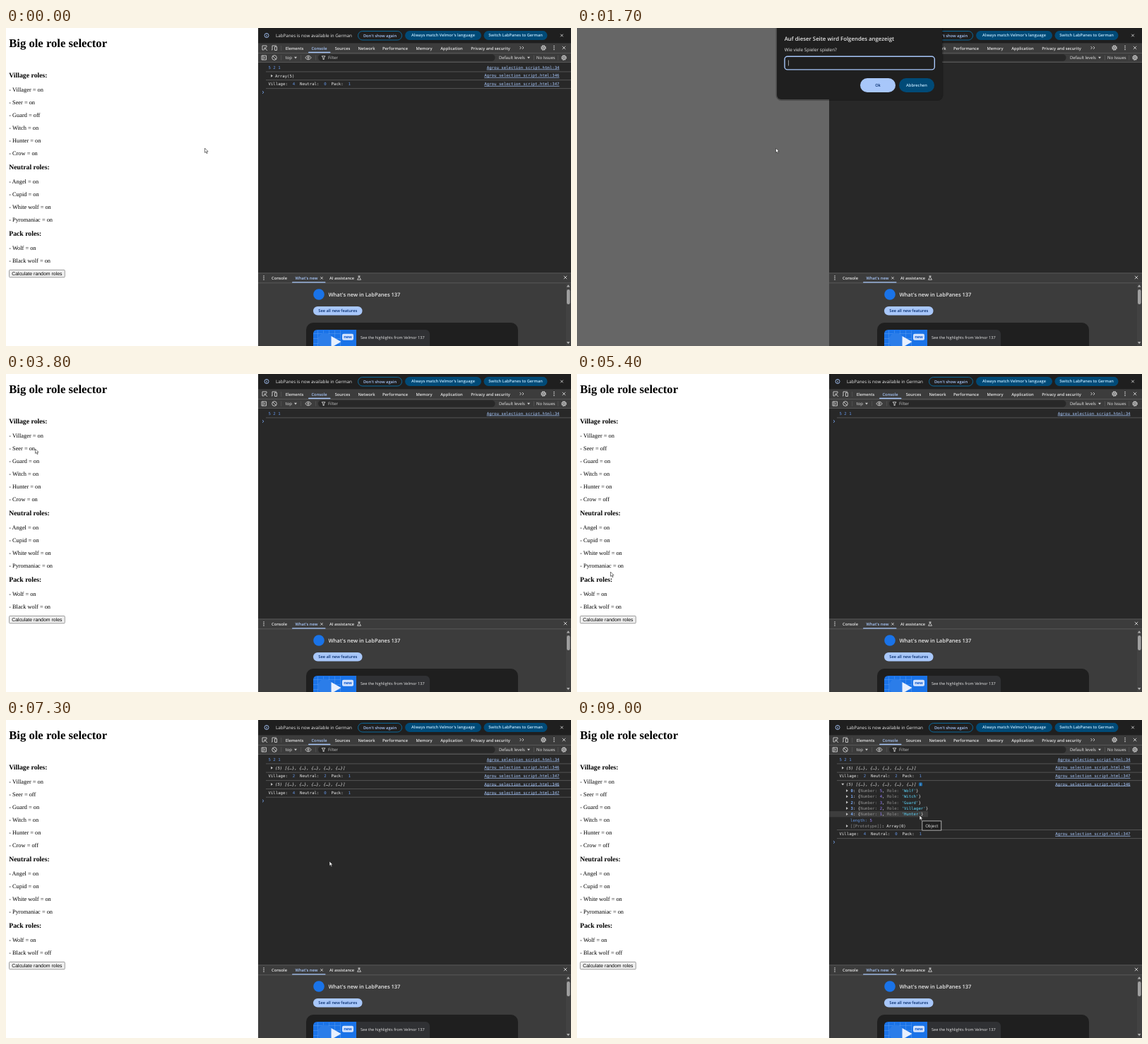
Recreate the animation shown at these times as an HTML page. Size 800 by 450 pixels, loop 9.3 s.

```html
<!DOCTYPE html>
<html lang="en">
<head>
<meta charset="utf-8">
<title>Role selector</title>
<style>
html, body { margin: 0; width: 100%; height: 100%; overflow: hidden; background: #282828; }
svg { display: block; width: 100vw; height: 100vh; }
text { white-space: pre; text-rendering: geometricPrecision; }
.ui { font-family: "Open Sans", "Noto Sans", sans-serif; }
.serif { font-family: "Liberation Serif", "Times New Roman", serif; }
.arial { font-family: "Liberation Sans", Arial, sans-serif; }
.mono { font-family: "DejaVu Sans Mono", monospace; font-size: 5.7px; }
.icon { fill: none; stroke: #d0d0d0; stroke-width: .9; }
</style>
</head>
<body>
<svg id="stage" viewBox="0 0 800 450"></svg>
<script>
const NS = 'http://www.w3.org/2000/svg';
const stage = document.getElementById('stage');
const PALE = '#a8c7fa', TEXT = '#e8e8e8', BLUE = '#6496e8', GREY = '#8f8f8f', CYAN = '#5cd5fb', VIOLET = '#9980ff';
const BAR = '#3c3c3c', DARK = '#1f1f1f', RULE = '#5e5e5e';
const EDGE = 357;

function add(parent, tag, attrs = {}) {
  const node = document.createElementNS(NS, tag);
  for (const key in attrs) node.setAttribute(key, attrs[key]);
  parent.append(node);
  return node;
}
const group = (parent = stage) => add(parent, 'g');
const rect = (g, x, y, width, height, fill, rx = 0, more = {}) =>
  add(g, 'rect', { x, y, width, height, fill, rx, ...more });
const path = (g, d, more = {}) => add(g, 'path', { d, class: 'icon', ...more });
const ring = (g, cx, cy, r, more = {}) => add(g, 'circle', { cx, cy, r, class: 'icon', ...more });

// y is the vertical middle of the line
function label(g, x, y, string, size = 6, more = {}) {
  const node = add(g, 'text', { x, y: y + size * .35, 'font-size': size, fill: TEXT, class: 'ui', ...more });
  node.textContent = string;
  return node;
}
const middle = { 'text-anchor': 'middle' };
const strong = { 'font-weight': 600 };

function code(g, x, y, parts, more = {}) {
  const node = add(g, 'text', { x, y: y + 2, class: 'mono', ...more });
  for (const [string, fill, weight = 400] of parts)
    add(node, 'tspan', { fill, 'font-weight': weight }).textContent = string;
}
const rule = (g, y, x = EDGE, fill = RULE) => rect(g, x, y, 800 - x, .8, fill);
const cross = (g, x, y, r = 2.2) => path(g, `M${x - r} ${y - r}l${2 * r} ${2 * r}m0 ${-2 * r}l${-2 * r} ${2 * r}`);
const triangle = (g, x, y, open) =>
  path(g, open ? `M${x - 2} ${y - 1.2}h4l-2 2.8z` : `M${x - 1.2} ${y - 2}v4l2.8 -2z`, { style: 'fill:#c7c7c7;stroke:none' });
const dots = (g, x, y) => [-2.6, 0, 2.6].forEach(d => add(g, 'circle', { cx: x, cy: y + d, r: .75, fill: TEXT }));
function gear(g, x, y) {
  ring(g, x, y, 3, { style: 'stroke-width:1.5;stroke-dasharray:1.55 .8' });
  ring(g, x, y, 2.3);
  ring(g, x, y, .9);
}

// Web page
const page = group();
rect(page, 0, 0, EDGE, 450, '#fff');
const ink = { class: 'serif', fill: '#000' }, bold = { ...ink, 'font-weight': 700 };
const MARGIN = 4.2;
label(page, MARGIN, 20.7, 'Big ole role selector', 16.67, bold);
const roles = {};
function section(y, title, names) {
  label(page, MARGIN, y, title, 9.75, bold);
  names.forEach((name, i) => roles[name] = label(page, MARGIN, y + 20 + i * 18, '', 8.33, ink));
}
section(67, 'Village roles:', ['Villager', 'Seer', 'Guard', 'Witch', 'Hunter', 'Crow']);
section(197, 'Neutral roles:', ['Angel', 'Cupid', 'White wolf', 'Pyromaniac']);
section(291, 'Pack roles:', ['Wolf', 'Black wolf']);
rect(page, 4.5, 342.4, 78.8, 10.4, '#efefef', 1.2, { stroke: '#767676', 'stroke-width': .7 });
label(page, 43.9, 347.4, 'Calculate random roles', 6.94, { ...middle, class: 'arial', fill: '#000' });
const dim = rect(stage, 0, 0, EDGE, 450, '#666');

// Developer panel
const panel = group();
rect(panel, EDGE, 0, 443, 450, '#282828');
rect(panel, EDGE, 0, 443, 21.5, DARK);
ring(panel, 369, 10.5, 3, { style: 'stroke:#a8c7fa' });
path(panel, 'M369 10v2.2M369 8.5v.8', { style: 'stroke:#a8c7fa' });
label(panel, 382, 11, 'LabPanes is now available in German', 6.25);
function pill(g, x, y, w, h, string, fill, color, more = {}) {
  rect(g, x, y, w, h, fill, h / 2, more);
  label(g, x + w / 2, y + h / 2, string, 5.7, { ...middle, ...strong, fill: color });
}
pill(panel, 498.5, 4.5, 62, 12.5, "Don't show again", 'none', PALE, { stroke: '#0b71a8', 'stroke-width': .9 });
pill(panel, 565, 4, 108, 13, "Always match Velmor's language", '#004a77', '#c2e7ff');
pill(panel, 676.5, 4, 90, 13, 'Switch LabPanes to German', '#004a77', '#c2e7ff');
cross(panel, 787, 10.5, 1.8);

rect(panel, EDGE, 21.5, 443, 27, BAR);
rule(panel, 35);
rule(panel, 48.2);
path(panel, 'M369 27v-2h-6v6h2M366 28l4 4M366 31v-3h3');
path(panel, 'M377 31h-1M377 31v-6h6M380.5 26.5h3v5h-3z');
rect(panel, 389.5, 25, .6, 7, RULE);
const tabs = [[408.5, 'Elements'], [443.5, 'Console'], [476.5, 'Sources'], [510.5, 'Network'], [551, 'Performance'],
  [592, 'Memory'], [631, 'Application'], [686, 'Privacy and security']];
for (const [x, name] of tabs)
  label(panel, x, 28.7, name, 5.75, { ...middle, ...strong, fill: name === 'Console' ? PALE : TEXT });
rect(panel, 428, 33.8, 31.5, 1.4, PALE, .7);
path(panel, 'M727.5 26l2 2 -2 2M731 26l2 2 -2 2');
gear(panel, 761, 28);
dots(panel, 776, 28);
cross(panel, 790, 28);

path(panel, 'M362 39h6.5v6h-6.5zM364 39v6M367 40.7l-1.6 1.3 1.6 1.3');
ring(panel, 380, 42, 3.3);
path(panel, 'M377.7 39.7l4.6 4.6');
for (const x of [389.5, 417.5, 438.5, 747, 781.5]) rect(panel, x, 38.5, .6, 7, RULE);
label(panel, 395.5, 42, 'top', 6);
triangle(panel, 410, 42, true);
path(panel, 'M423.7 42q4.3 -5.6 8.6 0q-4.3 5.6 -8.6 0z');
ring(panel, 428, 42, 1.2);
rect(panel, 442, 37.2, 250.5, 9.6, '#282828', 4.8);
path(panel, 'M447.2 39.8h4.8l-1.8 2.4v2.3h-1.2v-2.3z');
label(panel, 456, 42, 'Filter', 6, { fill: '#c7c7c7' });
label(panel, 698, 42, 'Default levels', 5.9);
triangle(panel, 740, 42, true);
label(panel, 751, 42, 'No Issues', 5.9);
gear(panel, 790, 42);

// Drawer
rect(panel, EDGE, 346.5, 443, 104, BAR);
rule(panel, 346.5);
rule(panel, 360.4);
dots(panel, 365, 353.5);
label(panel, 376, 354, 'Console', 5.75, strong);
label(panel, 409.5, 354, "What's new", 5.75, { ...strong, fill: PALE });
cross(panel, 447, 353.8, 1.7);
rect(panel, 405, 359.2, 47.5, 1.4, PALE, .7);
label(panel, 458, 354, 'AI assistance', 5.65, strong);
path(panel, 'M498.5 351h3M499.3 351v2.2l-1.8 3h5l-1.8 -3v-2.2');
cross(panel, 792, 353);
add(panel, 'circle', { cx: 443, cy: 377, r: 7.8, fill: '#1a73e8' });
label(panel, 456.5, 377.3, "What's new in LabPanes 137", 7.5, strong);
pill(panel, 435, 394, 69.5, 12.5, 'See all new features', PALE, '#062e6f');
rect(panel, 425, 417, 300, 50, DARK, 10);
rect(panel, 435, 427, 165, 40, '#303134', 6);
path(panel, 'M435 450v-17q0 -6 6 -6h55v23z', { style: 'fill:#1a73e8;stroke:none' });
for (let x = 441; x < 476; x += 8) rect(panel, x, 428, .5, 22, '#5b9cf0');
for (let y = 432; y < 450; y += 7) rect(panel, 435, y, 39, .5, '#5b9cf0');
add(panel, 'circle', { cx: 452, cy: 442, r: 10.5, fill: '#2b7de9' });
path(panel, 'M460.5 436v14h3.5l10.5 -6z', { style: 'fill:#e8f0fe;stroke:none' });
rect(panel, 476, 432.8, 16, 9, '#d3e3fd', 2);
label(panel, 484, 437.2, 'new', 5.6, { ...middle, fill: '#0b57d0', 'font-weight': 700 });
label(panel, 502, 438, 'See the highlights from Velmor 137', 5.55);
rect(panel, 793, 361, 7, 89, '#424242');
rect(panel, 794, 370, 4.6, 21, '#9f9f9f', 2.3);
path(panel, 'M793.8 366.5h4.6l-2.3 -3.2zM793.8 444h4.6l-2.3 3.2z', { style: 'fill:#b0b0b0;stroke:none' });

// Console logs
const CHAR = 3.43;
function link(g, y, line) {
  const name = `Agrou selection script.html:${line}`, end = 783.5, width = name.length * CHAR;
  code(g, end, y, [[name, PALE]], { 'text-anchor': 'end' });
  rect(g, end - width, y + 2.6, width, .7, PALE);
}
const prompt = (g, y) => path(g, `M363 ${y - 1.8}l1.9 1.8 -1.9 1.8`, { style: 'stroke:#7cacf8' });
function settings(g) {
  code(g, 371.5, 56, [['5 2 1', BLUE]]);
  link(g, 56, 34);
  rule(g, 61.5, 368);
}
function counts(g, y, village, neutral, pack) {
  code(g, 371.5, y, [['Village:  ', TEXT], [village, BLUE], ['  Neutral:  ', TEXT], [neutral, BLUE],
    ['  Pack:  ', TEXT], [pack, BLUE]]);
  link(g, y, 347);
  rule(g, y + 6, 368);
}
function list(g, y, open) {
  triangle(g, 376.3, y, open);
  code(g, 381, y, [[`(5) [${Array(5).fill('{…}').join(', ')}]`, TEXT]], { 'font-style': 'italic' });
  link(g, y - .4, 346);
  rule(g, open ? 155 : y + 6, 368);
}

const logs = [];
function log(from, to, draw) {
  const g = group();
  draw(g);
  logs.push({ g, from, to });
}
log(0, 700, g => {
  settings(g);
  triangle(g, 376.3, 67.7);
  code(g, 381, 67.7, [['Array(5)', TEXT]]);
  link(g, 67.3, 346);
  rule(g, 73.3, 368);
  counts(g, 79.3, 4, 0, 1);
  prompt(g, 91);
});
log(700, 3500, g => prompt(g, 54));
log(3500, 6300, g => { settings(g); prompt(g, 67); });
log(6300, 6700, g => { settings(g); list(g, 67.7); counts(g, 79.3, 2, 2, 1); prompt(g, 91); });
log(6700, 8100, g => {
  settings(g);
  list(g, 67.7); counts(g, 79.3, 2, 2, 1);
  list(g, 91); counts(g, 102.8, 4, 0, 1);
  prompt(g, 114.5);
});
const ROW = 8.3, FIRST = 100;
let hover;
log(8100, LOOP_END(), g => {
  hover = rect(g, EDGE, 0, 140, ROW, '#3d3d3d');
  settings(g);
  list(g, 67.7); counts(g, 79.3, 2, 2, 1);
  list(g, 91, true);
  rect(g, 484, 88.5, 5, 5, '#1768a8', 1);
  path(g, 'M486.5 90.8v1.8M486.5 89.3v.7', { style: 'stroke:#d3e3fd;stroke-width:.7' });
  ['Wolf', 'Witch', 'Guard', 'Villager', 'Hunter'].forEach((role, i) => {
    const y = FIRST + i * ROW;
    triangle(g, 382.3, y);
    code(g, 387.5, y, [[i, '#7cacf8', 700], [': {', TEXT], ['Number: ', GREY], [5 - i, VIOLET], [', ', TEXT],
      ['Role: ', GREY], [`'${role}'`, CYAN], ['}', TEXT]]);
  });
  code(g, 387, 141.5, [['length: ', '#5f8fd8'], ['5', VIOLET]]);
  triangle(g, 382.3, 150);
  code(g, 387, 150, [['[[Prototype]]', GREY], [': Array(0)', TEXT]]);
  counts(g, 161.3, 4, 0, 1);
  prompt(g, 172.8);
});
function LOOP_END() { return 9300; }

// Prompt dialog
const dialog = group();
rect(dialog, 281.5, -10, 237, 113, '#000', 8, { opacity: .25 });
rect(dialog, 283, -10, 234, 111, DARK, 6);
label(dialog, 293.7, 15.5, 'Auf dieser Seite wird Folgendes angezeigt', 7.8, strong);
label(dialog, 293.7, 31, 'Wie viele Spieler spielen?', 6.4);
rect(dialog, 294, 40.3, 212.3, 18.6, 'none', 4, { stroke: PALE, 'stroke-width': 1.4 });
const answer = label(dialog, 299, 49.5, '', 6.4);
const caret = rect(dialog, 299, 45.5, .6, 8, TEXT);
pill(dialog, 401, 71, 50, 20, 'Ok', PALE, '#062e6f');
pill(dialog, 456, 71, 50, 20, 'Abbrechen', '#004a77', '#c2e7ff');

const tooltip = group();
rect(tooltip, 488.8, 142.9, 27, 13.2, DARK, 0, { stroke: '#d0d0d0', 'stroke-width': .8 });
label(tooltip, 502.3, 149.5, 'Object', 6, middle);

const cursor = path(stage, 'M0 0V6.4L1.5 5.1 2.6 7.6 3.7 7.1 2.6 4.7H4.6Z',
  { style: 'fill:#fff;stroke:#222;stroke-width:.6' });

// Pointer stops: time, x, y
const stops = [[0, 281.5, 170], [2200, 281.5, 170], [2800, 419, 81], [3500, 419, 81], [3800, 41.5, 106],
  [4100, 41.5, 106], [4700, 40, 176], [5000, 40, 176], [5400, 47.5, 280], [5800, 57, 328], [6000, 57, 328],
  [6200, 46, 346], [6800, 46, 346], [7300, 458, 200], [7500, 458, 200], [8000, 376, 90], [8200, 376, 90],
  [8600, 470, 107], [8700, 485, 135], [9300, 485, 135]];
function pointer(t) {
  const i = stops.findIndex(s => s[0] > t);
  const [t0, x0, y0] = stops[i - 1], [t1, x1, y1] = stops[i];
  const p = (t - t0) / (t1 - t0), e = p * p * (3 - 2 * p);
  return [x0 + (x1 - x0) * e, y0 + (y1 - y0) * e];
}
const show = (node, on) => node.style.display = on ? '' : 'none';

const STEP = 100, LAST = 9000;
function render(t) {
  const off = { Guard: t < 700, Seer: t >= 4000, Crow: t >= 4800, 'Black wolf': t >= 5900 };
  for (const name in roles) roles[name].textContent = `- ${name} = ${off[name] ? 'off' : 'on'}`;
  for (const { g, from, to } of logs) show(g, t >= from && t < to);
  show(dim, t >= 700 && t < 3500);
  show(dialog, t >= 800 && t < 3500);
  const typed = t >= 2000;
  answer.textContent = typed ? '5' : '';
  caret.setAttribute('x', typed ? 302.8 : 299);
  const [x, y] = pointer(t);
  cursor.setAttribute('transform', `translate(${x} ${y})`);
  const row = Math.round((y - FIRST) / ROW);
  show(hover, x > 380 && row >= 0 && row < 5);
  hover.setAttribute('y', FIRST + (row - .5) * ROW);
  show(tooltip, t >= 8900);
}
const start = performance.now();
function tick() {
  const t = (performance.now() - start) % LOOP_END();
  render(Math.min(Math.floor(t / STEP) * STEP, LAST));
  requestAnimationFrame(tick);
}
tick();
</script>
</body>
</html>
```
